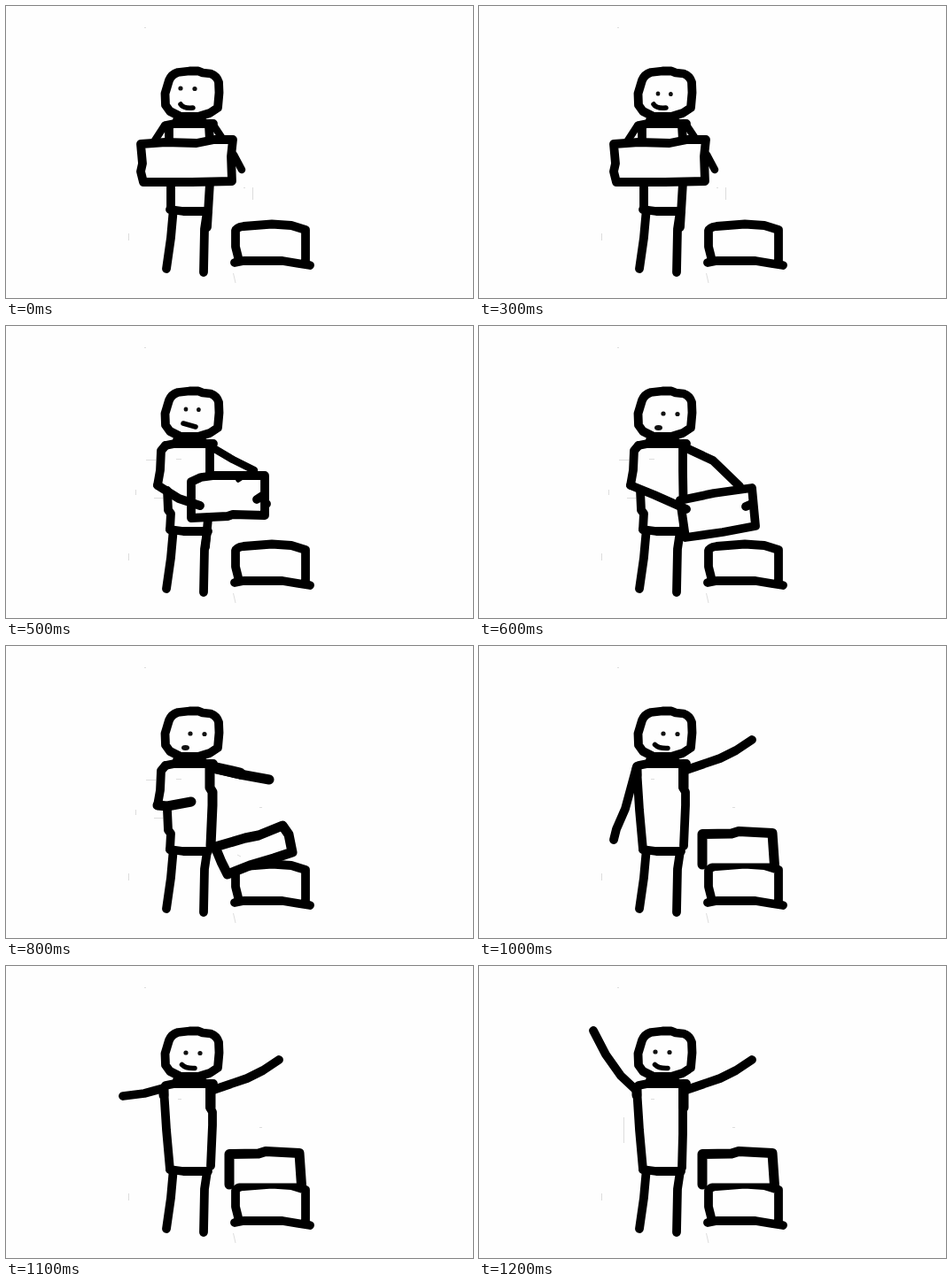
Recreate the animation shown at these times as an HTML page without scripts. Size 527x330 px, loop 1.5 s.

```html
<!DOCTYPE html>
<html lang="en">
<head>
<meta charset="utf-8">
<title>Stacking boxes</title>
<style>
html, body { margin: 0; width: 100%; height: 100%; overflow: hidden; background: #fefefe; }
svg { display: block; width: 527px; height: 330px; }
.ink { fill: none; stroke: #000; stroke-width: 9.8; stroke-linecap: round; stroke-linejoin: round; }
.box { fill: #fefefe; }
.bold { stroke-width: 11; }
.thin { stroke-width: 5.5; }
.dot { fill: #111; stroke: none; }
.dust { stroke: #ddd; stroke-width: 1; stroke-linecap: butt; }
.pose { visibility: hidden; animation: 1500ms step-end infinite; }
#hold { animation-name: hold; }
#ahead { animation-name: ahead; }
#glance { animation-name: glance; }
#lift { animation-name: lift; }
#lower { animation-name: lower; }
#drop { animation-name: drop; }
#stacked { animation-name: stacked; }
#point { animation-name: point; }
#swing { animation-name: swing; }
#cheer { animation-name: cheer; }
#look { animation-name: look; }
#marks { animation-name: marks; }
@keyframes hold { 0% { visibility: visible } 33.333%, 100% { visibility: hidden } }
@keyframes ahead { 0% { visibility: visible } 20%, 100% { visibility: hidden } }
@keyframes glance { 0% { visibility: hidden } 20% { visibility: visible } 33.333%, 100% { visibility: hidden } }
@keyframes lift { 0% { visibility: hidden } 33.333% { visibility: visible } 40%, 100% { visibility: hidden } }
@keyframes look { 0% { visibility: hidden } 40% { visibility: visible } 66.667%, 100% { visibility: hidden } }
@keyframes lower { 0% { visibility: hidden } 40% { visibility: visible } 53.333%, 100% { visibility: hidden } }
@keyframes drop { 0% { visibility: hidden } 53.333% { visibility: visible } 66.667%, 100% { visibility: hidden } }
@keyframes stacked { 0% { visibility: hidden } 66.667%, 100% { visibility: visible } }
@keyframes point { 0% { visibility: hidden } 66.667% { visibility: visible } 73.333%, 100% { visibility: hidden } }
@keyframes swing { 0% { visibility: hidden } 73.333% { visibility: visible } 80%, 100% { visibility: hidden } }
@keyframes cheer { 0% { visibility: hidden } 80%, 100% { visibility: visible } }
@keyframes marks { 0% { visibility: hidden } 33.333% { visibility: visible } 66.667%, 100% { visibility: hidden } }
</style>
</head>
<body>
<svg viewBox="0 0 527 330">
  <defs>
    <g id="eyes" class="dot"><circle r="2.6"/><circle cx="16" cy=".5" r="2.6"/></g>
    <path id="bent" d="M180 135L175 141L174 163L171 180"/>
    <path id="side" d="M182 186L183 208L186 212L185 230"/>
    <path id="back" d="M230 137V160L233 165V180L231 226"/>
    <path id="smile" class="thin" d="M198.500 111.500Q203 116 213 115.500"/>
  </defs>

  <path class="ink dust" d="M156 24.500H158M138.500 257V265M256.500 302L259 313"/>

  <g class="ink">
    <path d="M180 112L179.500 99L184 84Q187 77 194 75L207 73.500H217L222 75.500L231 76.500Q238 79 240 86L240.500 98L239 115L230 121L217 125H197L185 119Z"/>
    <path d="M193 129H221"/>
    <path d="M180 135L190 133H234"/>
    <path d="M185 230L200 232L228 232"/>
    <path d="M188.500 234L186 262L181 297"/>
    <path d="M227 232L224 252L223 301"/>
    <path d="M259 254Q260 250 268 249L300 246.500L322 248L338 253V290M259 254V272L262 284M258 290L268 288H312L330 291L343 293"/>
  </g>

  <g id="marks" class="pose ink dust">
    <path d="M146.500 185V191M158 151.500H169M192 150.500H198M167 194.500H177"/>
  </g>

  <g id="hold" class="pose ink">
    <path d="M184 136V154M229 136L230 152M186 200V230M230 200L227 250"/>
    <path d="M179 135L166 155M235 136L245 151M257 168L266 185" stroke-width="8.500"/>
    <path class="box" d="M152 156L180 154L215 155L235 151L256 151L254 170L255 198L210 199L155 199L152 187L154 178Z"/>
    <path class="thin" d="M197 111Q200 116 211 115"/>
    <path class="dust" d="M268 205.500H270M278.500 205V219"/>
  </g>
  <g id="ahead" class="pose"><use href="#eyes" x="197" y="93"/></g>
  <g id="glance" class="pose"><use href="#eyes" transform="translate(202 99) scale(.9 1)"/></g>

  <g id="lift" class="pose ink">
    <use href="#eyes" transform="translate(203 94) scale(.9 1)"/>
    <path class="thin" d="M200 110L207 112L214 114"/>
    <use href="#bent"/>
    <use href="#side"/>
    <path d="M230 137V166M228 218L225 250"/>
    <path d="M234 138L256 151L280 163" stroke-width="8.500"/>
    <path class="box" d="M209 176L220 171L235 169H292V214L256 213L250 215L209 217Z"/>
    <path d="M171 180L195 195L219 203M283 196L289 192M293 201H294"/>
    <path class="thin" d="M262 174L265 172"/>
  </g>

  <g id="look" class="pose ink">
    <use href="#eyes" x="208" y="99"/>
    <ellipse class="dot" cx="202.500" cy="115" rx="4.500" ry="3"/>
    <use href="#bent"/>
    <use href="#side"/>
  </g>
  <g id="lower" class="pose ink">
    <path d="M230 137V164L231 226"/>
    <path d="M234 138L264 152L294 181"/>
    <path class="box" d="M227 197L265 189L308 183L312 226L275 233L233 239Z"/>
    <path d="M171 180L198 191L234 207M301 204L308 201"/>
  </g>
  <g id="drop" class="pose ink">
    <use href="#back" class="bold"/>
    <path d="M171 180L182 181L209 176" class="bold"/>
    <path d="M234 138L264 145L297 151" class="bold"/>
    <path d="M233 137L264 144" stroke-width="13"/>
    <path class="box bold" d="M236 227L270 217L285 214L312 203L319 213L323 233L302 240L275 248L250 258L243 244Z"/>
    <path class="dust" d="M261 236L265 238M286 182.500H289"/>
  </g>

  <g id="stacked" class="pose ink">
    <rect x="257" y="217" width="72" height="28.500" fill="#fefefe" stroke="none"/>
    <use href="#smile"/>
    <path d="M178 138L181 185L185 230"/>
    <path d="M178 139V146M231 138V160" class="bold"/>
    <path d="M234 140L272 127L290 118L308 106"/>
    <path class="bold" d="M252 247V212.500L285 212L293 209.500L331 211.500L333.500 248"/>
    <path class="dust" d="M286 182.500H289M194 150.500H198"/>
  </g>
  <g id="point" class="pose ink">
    <use href="#eyes" x="208" y="99"/>
    <use href="#back"/>
    <path d="M178 136L165 184L155 207L152 219"/>
  </g>
  <g id="swing" class="pose ink">
    <use href="#eyes" x="203" y="98"/>
    <use href="#back"/>
    <path d="M178 138L156 144L132 147"/>
  </g>
  <g id="cheer" class="pose ink">
    <use href="#eyes" x="199" y="97"/>
    <path d="M230 138V190L229 228"/>
    <path d="M129 73L143 100L160 124L177 140"/>
    <path class="dust" d="M163.500 171V200"/>
  </g>
</svg>
</body>
</html>
```
